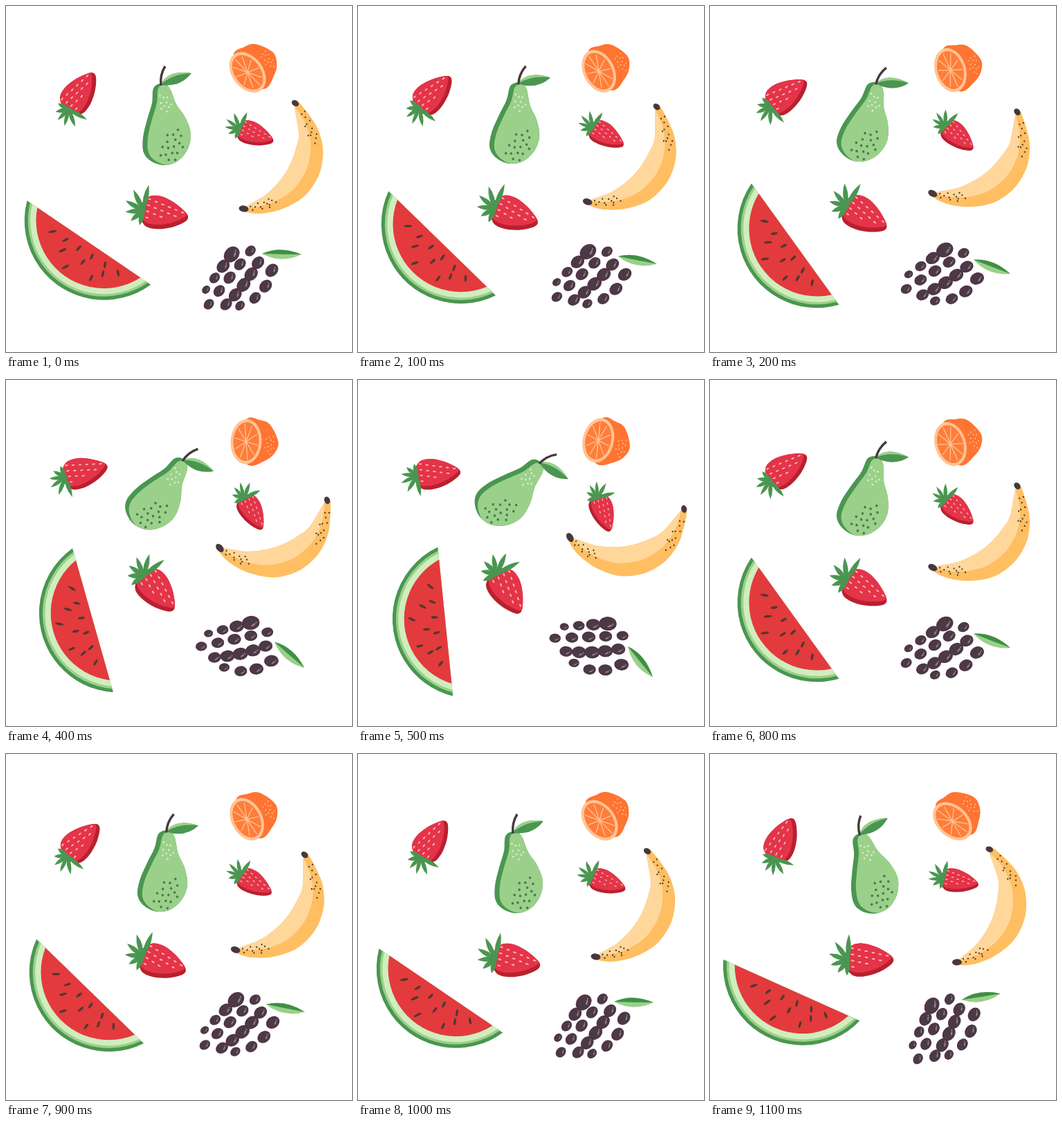
These frames come from a looping animation (500x500 px, 1.2 s). An HTML page with a canvas:

```html
<!DOCTYPE html>
<html lang="en">
<head>
<meta charset="utf-8">
<title>Swaying fruit</title>
<style>
html, body { margin: 0; width: 100%; height: 100%; overflow: hidden; background: #fff; }
canvas { display: block; width: 500px; height: 500px; }
</style>
</head>
<body>
<canvas id="stage" width="500" height="500"></canvas>
<script>
const ctx = document.getElementById('stage').getContext('2d');
const RAD = Math.PI / 180;
const STEP = 100, STEPS = 12, TURN = 10;
const GREEN = '#4a9650', LIGHT = '#9bd08a', PALE = '#d0edbe', DARK = '#46393c';

const mix = (a, b, t) => a + (b - a) * t;

// Smooth closed shape through a flat list of x, y
function blob(p, color) {
  const n = p.length / 2;
  const at = i => { const k = (i + n) % n * 2; return [p[k], p[k + 1]]; };
  ctx.beginPath();
  ctx.moveTo(p[0], p[1]);
  for (let i = 0; i < n; i++) {
    const a = at(i - 1), b = at(i), c = at(i + 1), d = at(i + 2);
    ctx.bezierCurveTo(
      b[0] + (c[0] - a[0]) / 6, b[1] + (c[1] - a[1]) / 6,
      c[0] - (d[0] - b[0]) / 6, c[1] - (d[1] - b[1]) / 6, c[0], c[1]);
  }
  ctx.fillStyle = color;
  ctx.fill();
}

// The lit side is the same shape, shifted and clipped
function shaded(p, shade, lit, dx, dy) {
  ctx.save();
  blob(p, shade);
  ctx.clip();
  ctx.translate(dx, dy);
  blob(p, lit);
  ctx.restore();
}

function oval(x, y, rx, ry, deg, color) {
  ctx.beginPath();
  ctx.ellipse(x, y, rx, ry, deg * RAD, 0, 7);
  ctx.fillStyle = color;
  ctx.fill();
}

function turned(x, y, deg, draw) {
  ctx.save();
  ctx.translate(x, y);
  ctx.rotate(deg * RAD);
  draw();
  ctx.restore();
}

// Even speckles in an ellipse, placed on a sunflower spiral
function speckle(x, y, rx, ry, deg, count, r, color) {
  turned(x, y, deg, () => {
    for (let i = 0; i < count; i++) {
      const d = Math.sqrt((i + .5) / count), a = i * 2.4;
      oval(rx * d * Math.cos(a), ry * d * Math.sin(a), r, r, 0, color);
    }
  });
}

// Area between two quadratic curves sharing both ends
function lens(x0, y0, ax, ay, x1, y1, bx, by, color) {
  ctx.beginPath();
  ctx.moveTo(x0, y0);
  ctx.quadraticCurveTo(ax, ay, x1, y1);
  ctx.quadraticCurveTo(bx, by, x0, y0);
  ctx.fillStyle = color;
  ctx.fill();
}

function melon() {
  const rings = [[114.8, GREEN], [109.8, LIGHT], [106.3, PALE], [98, '#e33a3d']];
  for (const [r, color] of rings) {
    const half = Math.acos(38.6 / r), mid = 124.2 * RAD;
    ctx.beginPath();
    ctx.arc(141.5, 310, r, mid - half, mid + half);
    ctx.closePath();
    ctx.fillStyle = color;
    ctx.fill();
  }
  // Rows of seeds: start, step, count
  for (const [x0, y0, dx, dy, n] of [[67, 326, 19, 12, 6], [82, 353, 29, 17, 3], [86, 377, 37, 16, 2]])
    for (let i = 0; i < n; i++) {
      const x = x0 + dx * i;
      oval(x, y0 + dy * i, i ? 5 : 6, 1.8, -10 - (x - 67) * .95, '#50392f');
    }
}

function pear() {
  shaded([224, 112, 213, 119, 211, 140, 204, 164, 198, 190, 199, 212, 211, 225, 230, 230,
    249, 223.5, 263, 206, 267, 184, 259, 161, 246, 142, 236, 118], GREEN, LIGHT, 7, 0);
  lens(223, 114, 234, 92, 268, 97, 252, 118, GREEN);
  lens(223, 114, 234, 92, 268, 97, 240, 98, LIGHT);
  ctx.beginPath();
  ctx.moveTo(224, 115);
  ctx.quadraticCurveTo(222, 100, 230, 87);
  ctx.lineWidth = 3.4;
  ctx.strokeStyle = DARK;
  ctx.stroke();
  speckle(230, 140, 9, 16, -20, 10, 1.5, PALE);
  speckle(240, 202, 17, 26, 25, 17, 1.8, '#417d4f');
}

function orange() {
  turned(357.5, 89.5, -40, () => {
    blob([-10, -33, 8, -32, 24, -25, 36, 0, 30, 17, 15, 28, -8, 33, -32, 0], '#ff7431');
    oval(-10.5, -.5, 22.5, 32.5, 3, '#ffc493');
    oval(-10.5, -.5, 18.5, 28, 3, '#ff7d3a');
    ctx.strokeStyle = '#ffc493';
    ctx.lineWidth = 1.3;
    ctx.beginPath();
    for (let i = 0; i < 10; i++) {
      const a = (i * 36 + 12) * RAD;
      ctx.moveTo(-10.5, -.5);
      ctx.lineTo(-10.5 + 17 * Math.cos(a), -.5 + 26 * Math.sin(a));
    }
    ctx.stroke();
    speckle(24, 4, 8, 15, 10, 13, 1, '#ffc493');
  });
}

function banana() {
  shaded([422, 138, 446, 169, 456, 194, 458, 218, 451, 247, 431, 275, 400, 293, 368, 300, 345, 297,
    347, 290, 375, 273, 396, 252, 410, 230, 419, 206, 423, 184, 417, 144], '#ffbe62', '#ffd79b', -18, -8);
  oval(418, 140.5, 5.5, 4, 30, DARK);
  oval(343.5, 293, 7, 4.6, 8, DARK);
  speckle(439, 177, 30, 7, 66, 13, 1.2, '#54402f');
  speckle(373, 287, 23, 7, -18, 13, 1.2, '#54402f');
}

function berry(x, y, deg, sx, sy, leafX, leafY) {
  turned(x, y, deg, () => {
    ctx.save();
    ctx.scale(sx, sy);
    shaded([-1, 0, 8, -20, 25, -24, 45, -18, 63, -7, 69, 1, 64, 9, 46, 19, 24, 24, 7, 20],
      '#b9202f', '#e4344a', -2, -6);
    for (let px = 10; px <= 60; px += 10) {
      const h = 20 - px / 4;
      for (let py = -h; py < h - 4; py += 9) oval(px, py, 2.5, 1.1, 8, '#f8b9ad');
    }
    ctx.restore();
    ctx.scale(leafX, leafY);
    for (let i = 0; i < 6; i++) {
      const len = 22 + 16 * (1 - i / 5) ** 2;
      turned(3, 0, -86 - i * 35.8, () => lens(0, 0, len * .45, -7, len, 0, len * .45, 7, GREEN));
    }
    oval(2, -1, 4, 12, 0, GREEN);
  });
}

function grape(x, y, r) {
  turned(x, y, -48, () => {
    oval(0, 0, r, r * .8, 0, '#5c2c49');
    oval(r * .07, r * .06, r * .92, r * .73, 0, '#493b45');
    oval(r * .25, r * .28, r * .3, r * .1, -25, '#a57b91');
    oval(r * .62, r * .06, r * .1, r * .08, 0, '#a57b91');
  });
}

function grapes() {
  // Diagonal rows: both ends, end sizes, count, outward bow
  const rows = [
    [289, 410, 326, 359, 6.5, 12.6, 4, 0],
    [293, 431, 353, 354, 8.2, 8.5, 5, 0],
    [318, 431, 364, 371, 9.4, 10, 5, 3],
    [338, 433, 384, 382, 7.6, 10.4, 4, 10]
  ];
  for (const [x0, y0, x1, y1, r0, r1, n, bow] of rows)
    for (let i = 0; i < n; i++) {
      const t = i / (n - 1), arch = Math.sin(Math.PI * t);
      grape(mix(x0, x1, t) + bow * arch * .74, mix(y0, y1, t) + bow * arch * .67, mix(r0, r1, t * t) + arch * 1.4);
    }
  lens(370, 358, 396, 346, 427, 359, 398, 373, LIGHT);
  lens(370, 358, 396, 346, 427, 359, 398, 359, '#3f8f45');
}

// Pivot and drawing of each piece
const fruit = [
  [115.3, 352.4, melon],
  [236.5, 158.5, pear],
  [357.5, 89.5, orange],
  [395.2, 220.4, banana],
  [99.5, 137.5, () => berry(89, 151.5, -56, .96, .92, .92, -.8)],
  [215.5, 290, () => berry(195, 295, 8, 1, 1, 1.05, 1)],
  [350, 183, () => berry(335, 177, 19, .79, .7, .88, .7)],
  [351, 393, grapes]
];

function frame(now) {
  const n = Math.floor(now / STEP) % STEPS;
  const deg = (5 - Math.abs(n - 5)) * TURN;
  ctx.fillStyle = '#fff';
  ctx.fillRect(0, 0, 500, 500);
  for (const [x, y, draw] of fruit) turned(x, y, deg, () => {
    ctx.translate(-x, -y);
    draw();
  });
}

let start;
function tick(now) {
  if (start === undefined) start = now;
  frame(now - start);
  requestAnimationFrame(tick);
}
frame(0);
requestAnimationFrame(tick);
</script>
</body>
</html>
```
